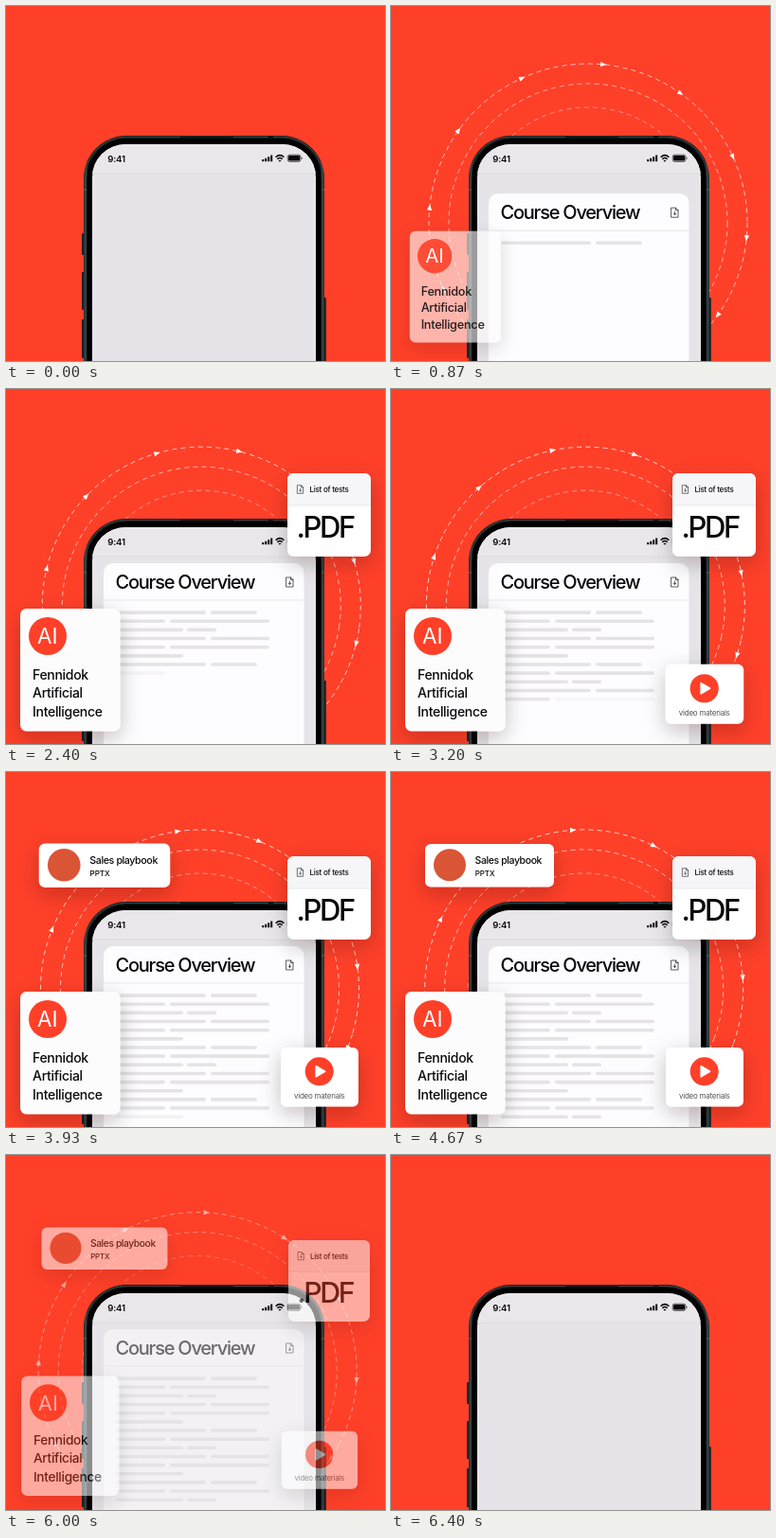
Write an HTML page that moves like this. It is 400 px wide and 375 px high and loops after 6470 ms.

```html
<!DOCTYPE html>
<html lang="en">
<head>
<meta charset="utf-8">
<title>Course overview</title>
<style>
  html, body { margin: 0; width: 100%; height: 100%; overflow: hidden; background: #ff4029; }
  svg { display: block; width: 100vw; height: 100vh; font-family: Inter, Roboto, sans-serif; font-weight: 500; }
  text { fill: #09090b; white-space: pre; }
  .card > rect:first-child { filter: url(#shadow); }
  .icon { fill: none; stroke: #333; stroke-width: .8; stroke-linejoin: round; stroke-linecap: round; }
</style>
</head>
<body>
<svg viewBox="0 0 400 375" preserveAspectRatio="xMidYMid slice">
  <defs>
    <filter id="shadow" x="-60%" y="-100%" width="220%" height="330%">
      <feDropShadow dx="0" dy="7" stdDeviation="11" flood-color="#2a0800" flood-opacity=".24"/>
    </filter>
    <linearGradient id="metal">
      <stop offset="0" stop-color="#1a2426"/>
      <stop offset=".008" stop-color="#394446"/>
      <stop offset=".018" stop-color="#101516"/>
      <stop offset=".982" stop-color="#101516"/>
      <stop offset=".992" stop-color="#394446"/>
      <stop offset="1" stop-color="#1a2426"/>
    </linearGradient>
    <clipPath id="screenClip"><rect x="91" y="146" width="236" height="300" rx="35"/></clipPath>
    <g id="doc" class="icon">
      <path d="M-3.5-5H1L3.5-2.5V5H-3.5ZM1-5V-2.5H3.5M0-.8V2.4M-1.3 1.2L0 2.5L1.3 1.2"/>
    </g>
  </defs>

  <rect width="400" height="375" fill="#ff4029"/>

  <g id="orbits" fill="none" stroke="#fff" stroke-width=".85"></g>

  <g id="phone">
    <g fill="#142224">
      <rect x="80" y="240" width="4" height="23" rx="1"/>
      <rect x="80" y="281" width="4" height="40" rx="1"/>
      <rect x="80" y="331" width="4" height="41" rx="1"/>
      <rect x="334" y="308" width="3.8" height="70" rx="1"/>
    </g>
    <rect x="82" y="137" width="254" height="330" rx="45" fill="url(#metal)"/>
    <rect x="83.3" y="138.3" width="251.4" height="330" rx="43.7" fill="none" stroke="#394446" stroke-width="1.2"/>
    <rect x="85.5" y="140.5" width="247" height="330" rx="41.5" fill="#000"/>
    <path d="M184 139H240M277 138.3H282" stroke="#0b0d0e" stroke-width="1.6"/>
    <path d="M82 194H85M333 194H336" stroke="#4c5658" stroke-width="1.5"/>
    <rect x="91" y="146" width="236" height="300" rx="35" fill="#e6e4e8"/>
    <g clip-path="url(#screenClip)">
      <rect x="91" y="146" width="236" height="31" fill="#e9e7ea"/>
      <path d="M91 177H327" stroke="#d9d7da" stroke-width=".8"/>
      <g id="sheet">
        <rect x="103" y="184" width="211.5" height="300" rx="10" fill="#fdfcfe"/>
        <path d="M103 223H314.5" stroke="#e7e5e9" stroke-width=".9"/>
        <text x="115.5" y="211" font-size="20" letter-spacing="-1.22">Course Overview</text>
        <use href="#doc" x="299.5" y="204"/>
        <g id="lines" fill="#e5e3e6"></g>
      </g>
    </g>
    <text x="107.3" y="164.7" font-size="9.6" font-weight="600" letter-spacing="-.2">9:41</text>
    <path d="M271.2 164.2V162M274.2 164.2V160.8M277.2 164.2V159.2M280.2 164.2V157.5" stroke="#09090b" stroke-width="2"/>
    <g fill="none" stroke="#09090b" stroke-width="1.5">
      <path d="M284.6 159.7Q289 155.6 293.4 159.7M286.3 161.7Q289 159.3 291.7 161.7"/>
      <path d="M287.7 163.1H290.3L289 164.4Z" fill="#09090b" stroke-width=".4"/>
    </g>
    <rect x="297.3" y="157.2" width="13.6" height="7.2" rx="2" fill="none" stroke="#333" stroke-width=".8"/>
    <rect x="298.1" y="158" width="12" height="5.6" rx="1.3" fill="#09090b"/>
    <path d="M312 159.7V161.8" stroke="#333" stroke-width=".9"/>
  </g>

  <g class="card" id="assistant">
    <rect x="15" y="232" width="105.5" height="129.5" rx="6.5" fill="#fdfcfd"/>
    <g>
      <circle cx="44" cy="261" r="20" fill="#ff4029"/>
      <text x="43.8" y="269" font-size="22.5" font-weight="400" text-anchor="middle" style="fill:#fff">AI</text>
      <g font-size="14" letter-spacing="-.3">
        <text x="28" y="306.5">Fennidok</text>
        <text x="28" y="326.2">Artificial</text>
        <text x="28" y="346">Intelligence</text>
      </g>
    </g>
  </g>

  <g class="card" id="tests">
    <rect x="297" y="89" width="88" height="88" rx="7" fill="#fff"/>
    <g>
      <path d="M297 123V96Q297 89 304 89H378Q385 89 385 96V123Z" fill="#f6f5f7"/>
      <path d="M297 123H385" stroke="#e4e2e5" stroke-width=".8"/>
      <use href="#doc" transform="translate(310.7 106) scale(.85)"/>
      <text x="320.5" y="109" font-size="8" letter-spacing="-.25">List of tests</text>
      <text x="306.5" y="157" font-size="31" letter-spacing="-2.4">.PDF</text>
    </g>
  </g>

  <g class="card" id="video">
    <rect x="290" y="291" width="82" height="62.5" rx="6" fill="#fff"/>
    <g>
      <circle cx="330.7" cy="316.3" r="15" fill="#ff4029"/>
      <path d="M327.2 310.7V321.9L336.6 316.3Z" fill="#fff" stroke="#fff" stroke-width="1.6" stroke-linejoin="round"/>
      <text x="304" y="345" font-size="8" font-weight="400" letter-spacing="-.26" style="fill:#555">video materials</text>
    </g>
  </g>

  <g class="card" id="slides">
    <rect x="36" y="76" width="136" height="45.5" rx="6" fill="#fff"/>
    <g>
      <circle cx="62" cy="98.3" r="17" fill="#d95536"/>
      <text x="88.6" y="97.2" font-size="10.5" letter-spacing="-.4">Sales playbook</text>
      <text x="88.8" y="110" font-size="8" letter-spacing="-.1">PPTX</text>
    </g>
  </g>
</svg>

<script>
const LOOP = 6470;
const byId = id => document.getElementById(id);
const clamp = v => Math.max(0, Math.min(1, v));
const progress = (t, start, length) => clamp((t - start) / length);
const easeOut = u => 1 - (1 - u) ** 3;
const easeBack = u => 1 + 2.7 * (u - 1) ** 3 + 1.7 * (u - 1) ** 2;

function add(parent, tag, attrs) {
  const el = document.createElementNS('http://www.w3.org/2000/svg', tag);
  for (const key in attrs) el.setAttribute(key, attrs[key]);
  parent.appendChild(el);
  return el;
}

// Dashed circles; only the outer one carries arrows.
const orbits = byId('orbits');
for (const [r, opacity] of [[168, .8], [147, .68], [122, .5]]) {
  add(orbits, 'circle', { cx: 208, cy: 229, r, opacity, 'stroke-dasharray': '5 4.2' });
}
for (let i = 0; i < 12; i++) {
  add(orbits, 'path', {
    d: 'M-3-2.6L3.4 0L-3 2.6Z', fill: '#fff', stroke: 'none',
    transform: `translate(208 229) rotate(${5.5 + 30 * i}) translate(0 -168)`
  });
}

// Placeholder text: six row patterns repeat down the sheet.
const patterns = [
  [[116, 211], [216, 265]], [[116, 168], [173, 278]], [[116, 187], [191, 222]],
  [[116, 211], [216, 278]], [[116, 168], [173, 278]], [[116, 187]]
];
const bars = [];
for (let row = 0; row < 15; row++) {
  for (const [from, to] of patterns[row % patterns.length]) {
    bars.push(add(byId('lines'), 'rect', {
      x: from, y: 234.3 + row * 9.15, width: to - from, height: 3.6, rx: 1.8
    }));
  }
}

const cards = [
  { el: byId('assistant'), start: 800, cx: 68, cy: 296.5 },
  { el: byId('tests'), start: 1850, cx: 341, cy: 133 },
  { el: byId('video'), start: 2770, cx: 331, cy: 322 },
  { el: byId('slides'), start: 3600, cx: 104, cy: 98.7 }
];

function draw(t) {
  const leave = progress(t, 5780, 500);
  const remain = 1 - leave;

  orbits.setAttribute('transform', `rotate(${5.4 * (t - 870) / 1000} 206 217)`);
  orbits.setAttribute('opacity', progress(t, 200, 450) * remain);

  const sheet = byId('sheet');
  sheet.setAttribute('transform', `translate(0 ${195 * (1 - easeOut(progress(t, 405, 800)))})`);
  sheet.setAttribute('opacity', remain);

  bars.forEach((bar, i) => {
    bar.setAttribute('opacity', i < 2 ? 1 : progress(t, 820 + 116 * i, 200));
  });

  for (const { el, start, cx, cy } of cards) {
    const scale = .8 + .2 * easeBack(progress(t, start, 500)) - .12 * leave * leave;
    const [panel, content] = el.children;
    el.setAttribute('transform', `translate(${cx} ${cy}) scale(${scale}) translate(${-cx} ${-cy})`);
    el.setAttribute('opacity', remain);
    panel.setAttribute('opacity', progress(t, start, 115));
    content.setAttribute('opacity', progress(t, start, 80));
  }
}

const origin = performance.now();
function tick() {
  draw((performance.now() - origin) % LOOP);
  requestAnimationFrame(tick);
}
draw(0);
requestAnimationFrame(tick);
</script>
</body>
</html>
```
